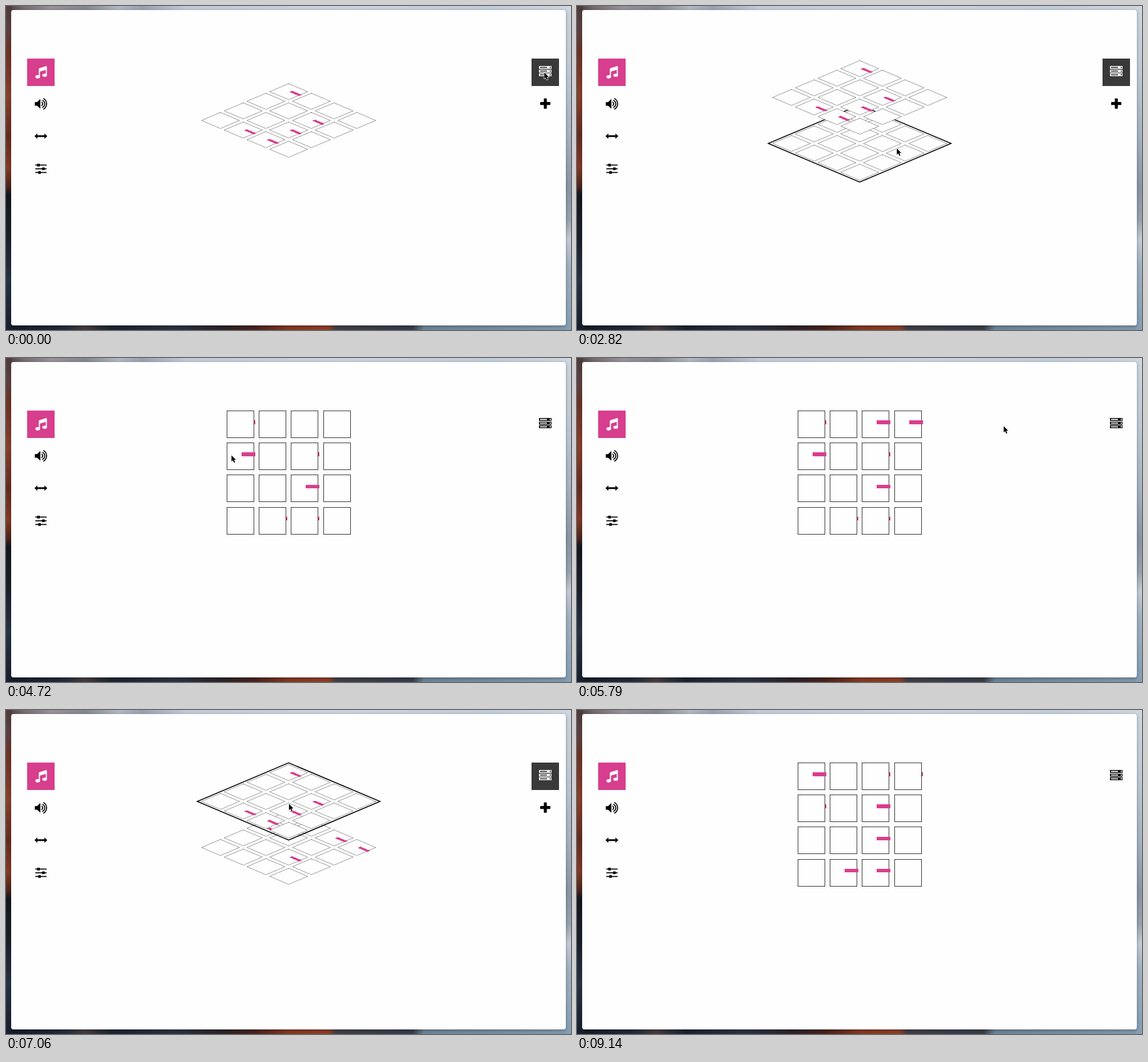
Recreate the animation shown at these times as an HTML page. Size 988 by 567 pixels, loop 9240 ms.

```html
<!DOCTYPE html>
<html lang="en">
<head>
<meta charset="utf-8">
<title>Layered step sequencer</title>
<style>
  html, body { margin: 0; width: 100%; height: 100%; overflow: hidden; }
  body { position: relative; background: #a9bac8; }
  .edge { position: absolute; }
  .top { left: 0; top: 0; width: 988px; height: 8px;
    background: linear-gradient(90deg, #4b3b3c, #756a6e 3%, #97919a 8%, #858790 14%, #b0b8c2 20%, #97a3af 24%, #bfccd7 32%, #c8d5df 60%, #c0ced8 85%, #ccd7df); }
  .left { left: 0; top: 0; width: 10px; height: 567px;
    background: linear-gradient(#4c3c3c, #5d4341 7%, #6d3328 14%, #8a4029 28%, #652c20 40%, #843b25 50%, #4a241d 56%, #15171f 58%, #1a212d 72%, #273444 84%, #172030); }
  .right { right: 0; top: 0; width: 10px; height: 567px;
    background: linear-gradient(#ccd7df, #bfccd6 20%, #a6b4c2 40%, #8a96a6 56%, #96a2b0 66%, #c4cdd5 72%, #a1b2c1 80%, #849eb4); }
  .bottom { left: 0; bottom: 0; width: 988px; height: 9px;
    background: linear-gradient(90deg, #131b27, #232c3a 10%, #463e41 14%, #1a2431 19%, #2c3541 30%, #2b242a 38%, #47251e 44%, #853a25 50%, #8f4029 57%, #41404a 58.5%, #383e49 72%, #6f879b 74%, #849db2); }
  .window { position: absolute; left: 9px; top: 7px; width: 970px; height: 552px; border-radius: 4px;
    background: #fefefe; box-shadow: 0 0 1px rgba(0,0,0,.45), 0 2px 6px rgba(0,0,0,.3); }
  svg { position: absolute; left: 0; top: 0; }
  .cell, .note { shape-rendering: crispEdges; }
  .cell { fill: #fefefe; stroke: #2b2b2b; stroke-width: 1; vector-effect: non-scaling-stroke; }
  .dark { fill: #393939; }
</style>
</head>
<body>
<div class="edge top"></div>
<div class="edge bottom"></div>
<div class="edge left"></div>
<div class="edge right"></div>
<div class="window"></div>
<svg width="988" height="567" viewBox="0 0 988 567">
  <rect x="37" y="92" width="48" height="48" fill="#d83e8e"/>
  <g fill="#fff">
    <path d="M57.4 110.4q0-1.3 1.2-1.7l11.2-3.4q1.7-.4 1.7 1.2v14.6h-2v-9.3l-10.1 3v9h-2z"/>
    <ellipse cx="55.4" cy="123.9" rx="4" ry="2.8"/>
    <ellipse cx="67.5" cy="121.2" rx="4" ry="2.8"/>
  </g>
  <path d="M50.4 168.2h4l5.7-5.4v17l-5.7-5.4h-4z"/>
  <g fill="none" stroke="#000" stroke-width="1.8" stroke-linecap="round">
    <path d="M62.6 168.5a3.2 3.2 0 0 1 0 5.6M64.2 165.2a7 7 0 0 1 0 12.2M65.8 162.1a10.8 10.8 0 0 1 0 18.4"/>
  </g>
  <path d="M49.8 227.7l5-4.7v3.2h12.4v-3.2l5 4.7-5 4.7v-3.2h-12.4v3.2z"/>
  <path d="M51.2 277.5h19.8v1.7h-19.8zM51.2 284h19.8v1.7h-19.8zM51.2 290.5h19.8v1.7h-19.8z"/>
  <path d="M54.6 275.9h4.4v4.8h-4.4zM63.2 282.4h4.4v4.8h-4.4zM56.4 288.9h4.4v4.8h-4.4z"/>

  <rect id="rackBox" class="dark" x="919" y="92" width="48" height="48"/>
  <path id="rack" fill-rule="evenodd"/>
  <g id="plus">
    <rect id="plusBox" class="dark" x="919" y="148" width="48" height="48"/>
    <path id="plusIcon" d="M940.5 162.6q0-.9.9-.9h3.4q.9 0 .9.9v5.5h5.3q.9 0 .9.9v3.4q0 .9-.9.9h-5.3v5.5q0 .9-.9.9h-3.4q-.9 0-.9-.9v-5.5h-5.5q-.9 0-.9-.9v-3.4q0-.9.9-.9h5.5z"/>
  </g>
  <g id="stack"></g>
  <path id="cursor" d="M.3 .3v11l2.5-2.3 1.8 4.2 1.9-.8-1.8-4.1h3.4z" stroke="#fff" stroke-width="1.5" stroke-linejoin="round" paint-order="stroke"/>
</svg>
<script>
const LOOP = 9240, CX = 494.3, CY = 200.3, PITCH = 56.2, HALF = 108.3;
const TILT = 65 * Math.PI / 180, SPIN = Math.PI / 4, LIFT = 40.3 / Math.sin(TILT);
const ADD = 1748, OPEN_LOW = 3440, BACK = 6500, OPEN_TOP = 7360, FLIP = 320;
const DOT = 1.086; // one pixel column along a stacked cell's edge

const $ = id => document.getElementById(id);
const clamp = u => Math.min(1, Math.max(0, u));
const smooth = u => u * u * (3 - 2 * u);
const ramp = (t, start, length) => smooth(clamp((t - start) / length));
const linear = u => u;
const settle = u => 1 - (1 - u) ** 4;
const show = (el, on) => el.setAttribute('visibility', on ? 'visible' : 'hidden');

// time, x, y, easing of the move that ends here
const path = [
  [0, 941, 116], [1150, 941, 116], [1400, 950, 183], [2140, 950, 183], [2820, 559, 249],
  [3160, 559, 249], [3430, 462, 230], [3760, 462, 230], [3980, 517, 236], [4180, 517, 236],
  [4560, 383, 172], [4640, 394, 170], [4720, 394, 170], [5070, 509, 140], [5110, 509, 140],
  [5460, 586, 128], [5700, 586, 128], [5790, 744.5, 119, linear], [6350, 942, 121, settle],
  [6530, 942, 121], [7060, 494.5, 164], [7480, 494.5, 164], [8270, 922, 545], [8360, 938, 567, linear]
];

function pointer(t) {
  const i = path.findIndex(k => k[0] > t);
  if (i < 0) return null;
  const [t0, x0, y0] = path[i - 1], [t1, x1, y1, ease = smooth] = path[i];
  const u = ease((t - t0) / (t1 - t0));
  return { x: x0 + (x1 - x0) * u, y: y0 + (y1 - y0) * u };
}

function make(tag, parent, attrs) {
  const el = document.createElementNS('http://www.w3.org/2000/svg', tag);
  for (const name in attrs) el.setAttribute(name, attrs[name]);
  return parent.appendChild(el);
}

// notes: [column, row, time it is switched on]
function makeLayer(notes) {
  const g = make('g', $('stack'), {});
  const frame = make('rect', g, { x: -113, y: -113, width: 226, height: 226, fill: 'none', stroke: '#000', 'stroke-width': 3 });
  const at = n => n * PITCH - HALF;
  for (let r = 0; r < 4; r++) for (let c = 0; c < 4; c++)
    make('rect', g, { class: 'cell', x: at(c) + .5, y: at(r) + .5, width: 47, height: 47 });
  const bars = notes.map(([c, r, on = 0]) => ({
    on, el: make('rect', g, { class: 'note', x: at(c) + 26, y: at(r) + 17.2, width: 24, height: 6.6, fill: '#d83e8e' })
  }));
  return { g, frame, bars };
}

const low = makeLayer([[2, 2, 4170], [0, 1, 4680], [2, 0, 5100], [3, 0, 5700]]);
const high = makeLayer([[0, 0], [2, 1], [2, 2], [1, 3], [2, 3]]);

$('rack').setAttribute('d', [105, 111.4, 117.8].map(y =>
  `M932 ${y}h22v5h-22zM933.7 ${y + 1.6}v1.8h12.4v-1.8zM950.6 ${y + 2.5}a1.2 1.2 0 1 0 2.4 0a1.2 1.2 0 1 0-2.4 0z`).join(''));

function place(layer, iso, z, t) {
  const a = SPIN * iso, b = TILT * iso, cb = Math.cos(b);
  layer.y = CY - z * Math.sin(b);
  layer.g.setAttribute('transform', `matrix(${[Math.cos(a), Math.sin(a) * cb, -Math.sin(a), Math.cos(a) * cb, CX, layer.y].map(v => v.toFixed(5)).join(' ')})`);
  layer.bars.forEach(b => b.el.setAttribute('display', t >= b.on ? 'inline' : 'none'));
}

const over = (p, layer) => Math.abs(p.x - CX) / 162 + Math.abs(p.y - layer.y) / 68.4 < 1;
const inBox = (p, y) => p.x >= 919 && p.x < 967 && p.y >= y && p.y < y + 48;

function draw(t) {
  const p = pointer(t), at = p || { x: -99, y: -99 };
  const stacked = t < OPEN_LOW || (t >= BACK && t < OPEN_TOP);
  const flat = t < BACK ? ramp(t, OPEN_LOW, FLIP)
    : t < OPEN_TOP ? 1 - ramp(t, BACK, FLIP) : ramp(t, OPEN_TOP, FLIP);
  const iso = 1 - flat;
  const spread = t >= BACK && t < OPEN_TOP ? 1 - flat ** 3 : iso;
  const rise = LIFT * ramp(t, ADD, 242);

  place(high, iso, rise * spread, t);
  place(low, iso, (rise - 2 * LIFT) * spread, t);
  low.g.setAttribute('display', t >= ADD + 8 ? 'inline' : 'none');

  // cell edges break into dots as the stack tilts
  $('stack').style.strokeDasharray = iso > 0 ? `${DOT} ${DOT * iso}` : 'none';

  // the opened layer ends up in front
  const front = flat > .93 && t >= OPEN_LOW && t < OPEN_TOP ? low : high;
  if ($('stack').lastChild !== front.g) $('stack').appendChild(front.g);

  const ready = stacked && iso === 1 && t > ADD;
  const onHigh = ready && over(at, high);
  show(high.frame, onHigh);
  show(low.frame, ready && !onHigh && over(at, low));
  high.frame.style.strokeDasharray = low.frame.style.strokeDasharray = 'none';

  const rackOn = stacked || inBox(at, 92), plusOn = inBox(at, 148);
  show($('rackBox'), rackOn);
  $('rack').setAttribute('fill', rackOn ? '#fff' : '#000');
  $('plus').setAttribute('display', stacked ? 'inline' : 'none');
  $('plusBox').setAttribute('display', plusOn ? 'inline' : 'none');
  $('plusIcon').setAttribute('fill', plusOn ? '#fff' : '#000');

  show($('cursor'), p);
  $('cursor').setAttribute('transform', `translate(${at.x.toFixed(2)} ${at.y.toFixed(2)})`);
}

const start = performance.now();
function tick() {
  draw((performance.now() - start) % LOOP);
  requestAnimationFrame(tick);
}
tick();
</script>
</body>
</html>
```
